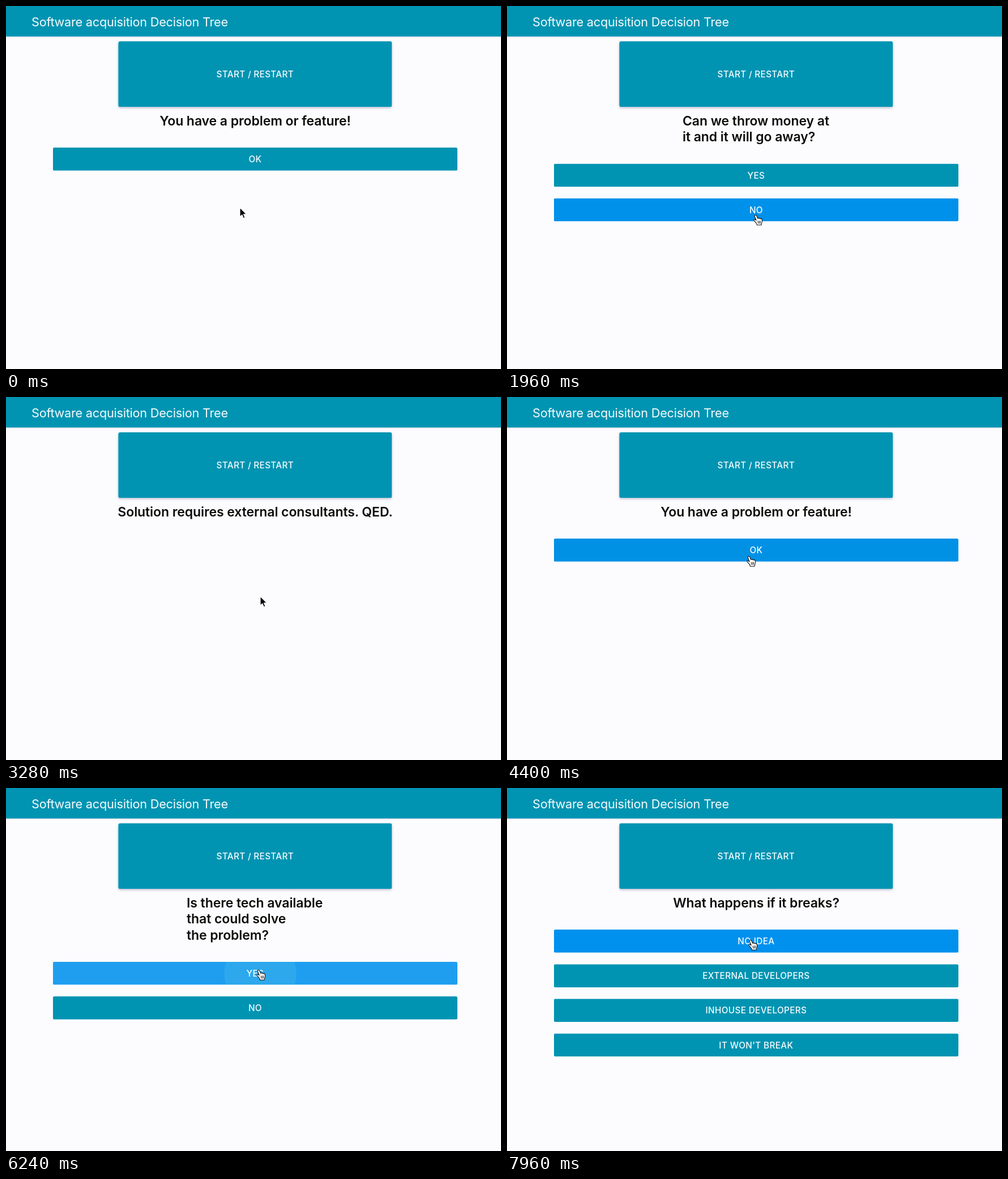
These frames come from a looping animation (874x641 px, 8000 ms). An HTML page:

```html
<!DOCTYPE html>
<html lang="en">
<head>
<meta charset="utf-8">
<title>Decision Tree</title>
<style>
  html, body { margin: 0; width: 100%; height: 100%; overflow: hidden; background: #fcfcff; }
  #stage { display: block; width: 874px; height: 641px; font-family: Inter, Roboto, sans-serif; }
  .title { font-size: 21.7px; letter-spacing: -.25px; fill: #f4fbfd; }
  .question { font-size: 23px; font-weight: 600; letter-spacing: -.08px; fill: #0c0c08; }
  .label { font-size: 15.3px; font-weight: 500; letter-spacing: .35px; fill: #f6fcfe; text-anchor: middle; }
  .bar { filter: drop-shadow(0 1px 1px rgba(60, 60, 110, .2)); }
  .raised { filter: drop-shadow(0 2px 2px rgba(40, 40, 100, .3)); }
</style>
</head>
<body>
<svg id="stage" viewBox="0 0 874 641">
  <rect width="874" height="641" fill="#fcfcff"/>
  <rect class="bar" width="874" height="53.8" fill="#0094b2"/>
  <text class="title" x="45" y="36">Software acquisition Decision Tree</text>
  <rect class="raised" x="198.5" y="62.5" width="482.7" height="115.5" rx="3" fill="#0094b2"/>
  <g id="buttons"></g>
  <g id="lines"></g>
  <g id="arrow" stroke-linejoin="round">
    <path d="M0 0V16.2L3.7 12.8L6.4 18.8L9 17.7L6.4 11.8H11.6Z" fill="#000" stroke="#fff" stroke-width="1.1"/>
  </g>
  <g id="hand" stroke="#111" stroke-linejoin="round" stroke-linecap="round">
    <path transform="translate(-4.5 -.5)" stroke-width="1.1" fill="#fff" d="M4.5 1C3.3.7 2.4 1.7 2.8 2.9L5.6 10.2L3.6 8.8C2 8 .8 9.2 1.8 10.6L6 15.5L7 18.5H14.5L15.2 15C16.4 12.8 16.3 10 15.6 8C15.2 6.8 13.8 6.8 13.4 7.8C13.2 6.4 11.4 6 10.9 7.2C10.5 5.8 8.6 5.6 8.2 6.8L6.2 2C5.8 1.3 5.2 1 4.5 1Z"/>
    <path transform="translate(-4.5 -.5)" stroke-width=".9" fill="none" d="M8.7 11.5L9.2 15.5M10.9 11.3L11.2 15.5M13 11.2V15.5"/>
  </g>
</svg>
<script>
const LOOP = 8000, PRESS = 140, RELEASE = 250, FADE = 200;
const TEAL = [0, 148, 178], BLUE = [0, 145, 238];
const NS = "http://www.w3.org/2000/svg";
const byId = id => document.getElementById(id);
const clamp = v => Math.max(0, Math.min(1, v));

// press: the button clicked to leave the screen, 0 being START
const problem = { lines: ["You have a problem or feature!"], options: ["OK"] };
const tech = { lines: ["Can Tech solve it?"], options: ["YES", "NO"] };
const screens = [
  { at: 0, press: 1, ...problem },
  { at: 960, press: 2, ...tech },
  { at: 1650, press: 2, left: 310, lines: ["Can we throw money at", "it and it will go away?"], options: ["YES", "NO"] },
  { at: 2780, press: 0, lines: ["Solution requires external consultants. QED."], options: [] },
  { at: 4060, press: 1, ...problem },
  { at: 4780, press: 1, ...tech },
  { at: 5640, press: 1, left: 319, lines: ["Is there tech available", "that could solve", "the problem?"], options: ["YES", "NO"] },
  { at: 6280, press: 2, lines: ["How do we get the tech?"], options: ["BUY IT", "RENT IT", "BUILD IT", "OPEN SOURCE", "NO IDEA"] },
  { at: 7160, lines: ["What happens if it breaks?"], options: ["NO IDEA", "EXTERNAL DEVELOPERS", "INHOUSE DEVELOPERS", "IT WON'T BREAK"] }
];

// pointer stops: time, x, y
const stops = [
  [0, 413, 356], [200, 413, 356], [620, 432, 281], [1340, 432, 281], [1440, 434, 320],
  [1560, 436, 332], [1700, 436, 332], [2100, 440, 383], [2300, 440, 383], [2560, 439, 358],
  [2780, 439, 358], [3000, 446, 427], [3260, 449, 352], [3560, 449, 352], [3920, 436, 150],
  [4080, 436, 150], [4340, 427, 281], [5700, 428, 278], [5980, 446, 321], [7240, 446, 321],
  [7600, 430, 268], [8000, 430, 268]
];

function pointer(t) {
  const i = Math.max(1, stops.findIndex(s => s[0] > t));
  const [t0, x0, y0] = stops[i - 1], [t1, x1, y1] = stops[i];
  const p = clamp((t - t0) / (t1 - t0)), e = p * p * (3 - 2 * p);
  return [x0 + (x1 - x0) * e, y0 + (y1 - y0) * e];
}

function box(screen, i) {
  if (i === 0) return { x: 198.5, y: 62.5, w: 482.7, h: 115.5 };
  return { x: 82.8, y: 250.1 + 28.4 * (screen.lines.length - 1) + 61.1 * (i - 1), w: 714.2, h: 40.7 };
}

function inside(b, t) {
  const [x, y] = pointer(t);
  return x >= b.x && x <= b.x + b.w && y >= b.y && y <= b.y + b.h;
}

// share of the last moments spent over the button
function hover(b, t, since) {
  const n = 20;
  let sum = 0;
  for (let k = 0; k < n; k++) sum += inside(b, Math.max(since, t - k * FADE / n));
  const p = sum / n;
  return p * p * (3 - 2 * p);
}

function add(parent, tag, attrs = {}) {
  const el = document.createElementNS(NS, tag);
  set(el, attrs);
  return parent.appendChild(el);
}
function set(el, attrs) {
  for (const k in attrs) el.setAttribute(k, attrs[k]);
}
const show = (el, on) => set(el, { display: on ? "inline" : "none" });

const buttons = Array.from({ length: 6 }, () => {
  const root = add(byId("buttons"), "svg", { overflow: "hidden" });
  return {
    root,
    face: add(root, "rect", { rx: 2.5 }),
    tint: add(root, "rect", { rx: 2.5, fill: "#fff" }),
    wave: add(root, "circle", { fill: "#7fe0d0" }),
    label: add(root, "text", { class: "label" })
  };
});
const lines = Array.from({ length: 3 }, () => add(byId("lines"), "text", { class: "question" }));

function drawButton(i, n, t) {
  const ui = buttons[i], screen = screens[n], text = i ? screen.options[i - 1] : "START / RESTART";
  show(ui.root, text);
  if (!text) return;
  const b = box(screen, i), h = hover(b, t, i ? screen.at : 0);
  const color = TEAL.map((c, k) => Math.round(c + (BLUE[k] - c) * h));
  set(ui.root, { x: b.x, y: b.y, width: b.w, height: b.h });
  set(ui.face, { width: b.w, height: b.h, fill: `rgb(${color})` });

  const next = screens[n + 1], prev = screens[n - 1];
  let down = -1, glow = 0;
  if (next && screen.press === i && t >= next.at - PRESS) {
    down = next.at - PRESS;
    glow = clamp((t - down) / 60);
  } else if (prev && prev.press === i && t < screen.at + RELEASE) {
    down = screen.at - PRESS;
    glow = 1 - (t - screen.at) / RELEASE;
  }
  const [px, py] = pointer(Math.max(0, down));
  set(ui.tint, { width: b.w, height: b.h, opacity: .12 * glow });
  set(ui.wave, {
    cx: px + 3 - b.x, cy: Math.max(0, Math.min(b.h, py + 7 - b.y)),
    r: down < 0 ? 0 : Math.min(400, (t - down) * .63), opacity: .14 * glow
  });
  set(ui.label, { x: b.w / 2, y: b.h / 2 + 5.8 });
  ui.label.textContent = text;
}

function draw(t) {
  const n = screens.findLastIndex(s => s.at <= t), screen = screens[n];
  buttons.forEach((_, i) => drawButton(i, n, t));
  lines.forEach((el, i) => {
    el.textContent = screen.lines[i] || "";
    set(el, { x: screen.left || 440, y: 211 + 28.4 * i, "text-anchor": screen.left ? "start" : "middle" });
  });

  const [x, y] = pointer(t);
  const over = buttons.some((_, i) => i <= screen.options.length && inside(box(screen, i), t));
  const at = { transform: `translate(${x.toFixed(2)} ${y.toFixed(2)})` };
  for (const [id, on] of [["hand", over], ["arrow", !over]]) {
    set(byId(id), at);
    show(byId(id), on);
  }
}

const begin = performance.now();
function tick() {
  draw((performance.now() - begin) % LOOP);
  requestAnimationFrame(tick);
}
tick();
</script>
</body>
</html>
```
